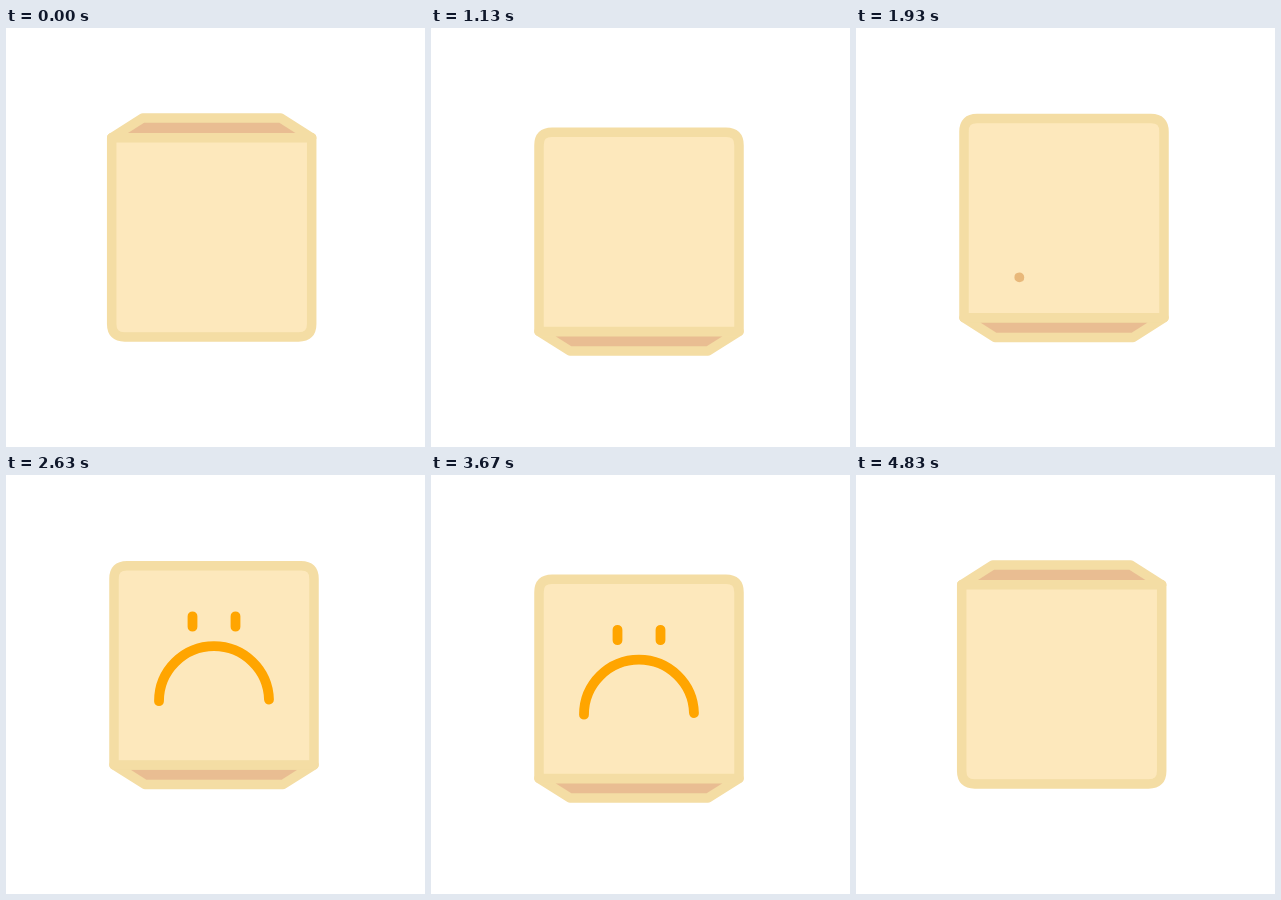
These frames come from a looping animation (419 by 419 pixels, 6.01 s). An HTML page:

```html
<!DOCTYPE html>
<html lang="en">
<head>
<meta charset="utf-8">
<title>Tumbling box</title>
<style>
  html, body { margin: 0; width: 100%; height: 100%; overflow: hidden; background: #fff; }
  svg { display: block; width: 100%; height: 100%; }
  .box { stroke: #f4dda4; stroke-width: 9.5; stroke-linejoin: round; }
  .face { fill: none; stroke-width: 9.8; stroke-linecap: round; }
</style>
</head>
<body>
<svg viewBox="0 0 419 419">
  <g id="body">
    <g class="box">
      <path fill="#e9bd92" d="M-100-90L-69-109.7H69L100-90Z"/>
      <path fill="#fde8bc" d="M-100-90H100V96.2Q100 109.2 87 109.2H-87Q-100 109.2-100 96.2Z"/>
    </g>
    <g class="face" transform="rotate(180)">
      <path id="mouth" pathLength="100"/>
      <path id="eyes" stroke="#ffa500"/>
    </g>
  </g>
</svg>
<script>
const LOOP = 6010;
const body = document.getElementById('body');
const mouth = document.getElementById('mouth');
const eyes = document.getElementById('eyes');

const progress = (t, from, to) => Math.min(1, Math.max(0, (t - from) / (to - from)));
const ease = (t, from, to) => (1 - Math.cos(Math.PI * progress(t, from, to))) / 2;
const easeOut = (t, from, to) => Math.sin(Math.PI / 2 * progress(t, from, to));
const bump = (t, from, to) => Math.sin(Math.PI * progress(t, from, to)) ** 2;
const mix = (a, b, p) => a + (b - a) * p;

function moveBody(t) {
  const turned = ease(t, 0, 708) - ease(t, 4290, 4820);
  const hop = Math.sin(Math.PI * progress(t, 0, 708) ** 1.5) ** 3;
  const landing = bump(t, 600, 950);
  const rise = ease(t, 1390, 2300) - easeOut(t, 2310, 3670);

  const x = mix(205.7, 208, turned) - 48.3 * hop - 14.5 * bump(t, 4290, 4820);
  const y = 199.7 + 13.7 * turned - 34.4 * hop + 7.5 * landing - 21.2 * rise
    + 25 * bump(t, 4430, 4820);
  body.setAttribute('transform', `translate(${x} ${y}) rotate(${180 * turned})`);
}

function drawMouth(t) {
  const bend = ease(t, 1940, 2580);
  const length = 100 * (ease(t, 1900, 2350) - ease(t, 3880, 4290));
  const half = mix(44.7, 55, bend), y = mix(49.7, 26.3, bend);
  // A short first stretch keeps the pen's starting dot in place.
  const dash = Math.max(0, length - 1);
  mouth.setAttribute('d', `M${-half} ${y}A${half} ${Math.max(0.1, 55 * bend)} 0 0 1 ${half} ${y}`);
  mouth.setAttribute('stroke', `rgb(${mix(232, 255, bend)},${mix(184, 165, bend)},${mix(122, 0, bend)})`);
  mouth.setAttribute('stroke-dasharray', `${dash + 0.1} 300`);
  mouth.style.display = length > 0 ? '' : 'none';
}

function drawEyes(t) {
  const size = ease(t, 2180, 2480) - ease(t, 3780, 4040);
  const reach = 5.2 * size;
  const eye = x => `M${x} ${-53.4 - reach}V${-53.4 + reach}`;
  eyes.setAttribute('d', eye(-21.5) + eye(21.5));
  eyes.style.strokeWidth = 9.8 * Math.min(1, size * 2);
  eyes.style.display = size > 0 ? '' : 'none';
}

const start = performance.now();
function frame() {
  const t = (performance.now() - start) % LOOP;
  moveBody(t);
  drawMouth(t);
  drawEyes(t);
  requestAnimationFrame(frame);
}
frame();
</script>
</body>
</html>
```
